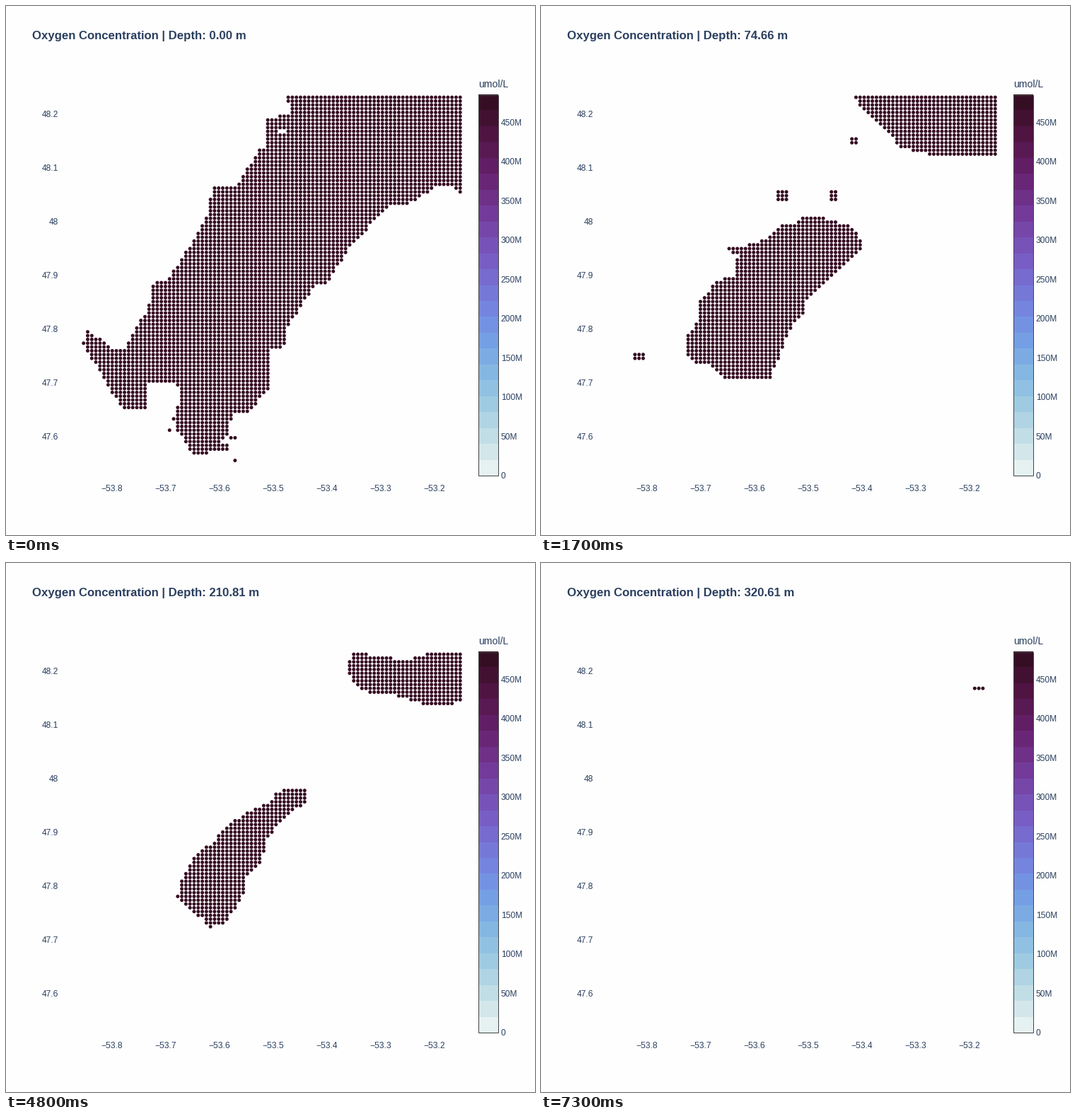
These frames come from a looping animation (748x748 px, 7.4 s). A matplotlib script:

```python
import numpy as np
import matplotlib.pyplot as plt
from matplotlib.animation import FuncAnimation
from matplotlib.colors import LinearSegmentedColormap
from matplotlib.patches import Rectangle

SIZE, DPI = 748, 100
FRAMES, STEP_MS = 74, 100
MAX_DEPTH = 320.61
INK, DOT, PAPER = "#2a3f5f", "#350b22", "#fefefe"
DENSE = ["#e6f1f1", "#bfdde5", "#9cc9e2", "#81b4e3", "#739ae4", "#757fdd",
         "#7864ca", "#774aaf", "#71328d", "#641f68", "#501442", "#360e24"]

# Sampling grid of the bay, in stage pixels
GX, GY = np.meshgrid(109.7 + 5.788 * np.arange(93), 129.1 + 5.349 * np.arange(97))
GRID = np.column_stack([GX.ravel(), GY.ravel()])


def pond(x, y, rx=2, ry=2):
    return [(x - rx, y - ry), (x + rx, y - ry), (x + rx, y + ry), (x - rx, y + ry)]


def signed_distance(outline):
    """Distance of every grid point to an outline, positive inside."""
    x, y = GRID.T
    dist = np.full(len(GRID), 1e9)
    inside = np.zeros(len(GRID), bool)
    for (px, py), (qx, qy) in zip(outline, outline[1:] + outline[:1]):
        dx, dy = qx - px, qy - py
        t = np.clip(((x - px) * dx + (y - py) * dy) / (dx * dx + dy * dy), 0, 1)
        dist = np.minimum(dist, np.hypot(x - px - t * dx, y - py - t * dy))
        if dy:
            inside ^= ((py > y) != (qy > y)) & (x < px + dx * (y - py) / dy)
    return np.where(inside, dist, -dist)


def field(*outlines, island=None):
    f = np.max([signed_distance(o) for o in outlines], axis=0)
    if island:
        f = np.minimum(f, -signed_distance(island) - 2)
    return np.maximum(f, -25)


# Key points of the water's edge at a few depths
east_shore = [
    (399, 129), (642, 129), (642, 264), (631, 253), (608, 255), (567, 280),
    (541, 280), (485, 340), (452, 391), (437, 391), (394, 456), (393, 480),
    (371, 486), (371, 540), (340, 575), (318, 577), (312, 604), (283, 632),
    (266, 632)]
west_shore = [
    (243, 599), (237, 583), (248, 560), (248, 540), (240, 532), (197, 532),
    (197, 566), (167, 568), (150, 545), (132, 513), (110, 477), (115, 461),
    (155, 489), (170, 486), (185, 455), (203, 429), (210, 394), (230, 388),
    (284, 304), (289, 275), (295, 258), (327, 257), (359, 205), (368, 203),
    (371, 160), (404, 155)]
surface = field(east_shore + west_shore, pond(231, 600), pond(323.5, 642.5),
                pond(321, 612), pond(303, 624, 9, 4), island=pond(390, 177, 4, 1))

north = [(434, 129), (642, 129), (642, 221), (600, 231), (490, 231), (434, 221),
         (434, 216), (446, 206), (434, 190), (442, 150)]
south = [
    (352, 285), (411, 280), (470, 284), (474, 318), (466, 348), (422, 397),
    (405, 405), (417, 418), (396, 426), (381, 478), (365, 480), (347, 518),
    (318, 545), (318, 572), (289, 594), (260, 583), (254, 561), (254, 537),
    (243, 526), (190, 526), (162, 497), (185, 489), (213, 407), (243, 386),
    (260, 362), (254, 346), (295, 320), (325, 293)]
cove = [(115, 478), (138, 478), (145, 503), (126, 503)]
point = [(488, 291), (510, 307), (497, 322), (485, 322)]
sills = [pond(x, 241, 6, 6) for x in (342, 417, 445, 467, 491, 514, 541, 567)]
sills += [pond(x, 268, 6, 6) for x in (336, 348, 363, 391, 413, 440, 465)]
shallow = field(north, south, cove, point, pond(417, 204, 1, 17),
                pond(362, 520, 3, 5), *sills, island=pond(379, 455, 4, 4))

north = [(446, 129), (642, 129), (642, 210), (555, 210), (508, 198), (497, 184),
         (452, 140)]
south = [
    (371, 300), (394, 300), (434, 311), (451, 331), (451, 342), (399, 391),
    (371, 418), (371, 434), (353, 451), (323, 525), (260, 525), (237, 504),
    (219, 503), (208, 492), (208, 467), (226, 445), (226, 420), (249, 391),
    (275, 383), (280, 352), (266, 344), (310, 336), (341, 311), (360, 309)]
middle = field(north, south, pond(342, 269, 6, 6), pond(415, 269, 5, 6),
               pond(443, 191, 4, 4), pond(138.5, 495, 6, 4))

north = [(491, 129), (538, 134), (562, 145), (602, 129), (642, 129), (642, 194),
         (590, 194), (562, 180), (514, 178), (491, 167)]
south = [
    (417, 322), (417, 332), (382, 354), (359, 391), (359, 418), (330, 442),
    (330, 467), (306, 504), (289, 509), (289, 499), (254, 472), (254, 456),
    (283, 413), (335, 370), (376, 350), (394, 328)]
trench = field(north, south)

floor = field([(596, 167), (642, 156), (642, 177), (596, 177)])
last = field(pond(619, 177, 6, 1))

# Frame, field there, and easing power on the way to the next one
KEYS = [(0, surface, 1), (5, shallow, 1), (17, middle, 1.5), (54, trench, 1),
        (72, floor, 1), (73, last, 1)]


def wet_points(frame):
    """Grid points still under water, blended between the known depths."""
    for (t0, f0, power), (t1, f1, _) in zip(KEYS, KEYS[1:]):
        if frame <= t1:
            k = ((frame - t0) / (t1 - t0)) ** power
            return GRID[f0 * (1 - k) + f1 * k > -1.8]


fig = plt.figure(figsize=(SIZE / DPI, SIZE / DPI), dpi=DPI, facecolor=PAPER)
ax = fig.add_axes([0, 0, 1, 1])
ax.set(xlim=(0, SIZE), ylim=(SIZE, 0))
ax.axis("off")


def label(x, baseline, text, px=12, ha="left", weight="normal"):
    return ax.text(x, baseline, text, fontsize=px * 72 / DPI, ha=ha,
                   va="baseline", weight=weight, color=INK,
                   family="Liberation Sans")


for n in range(7):
    label(74, 157.3 + 76 * n, f"{round(48.2 - n / 10, 1):g}", ha="right")
    label(150 + 76 * n, 685.8, f"\u2212{53.8 - n / 10:.1f}", ha="center")

# Colour bar in flat bands
BAR_TOP, BAR_END, BANDS = 125, 664, 24
dense = LinearSegmentedColormap.from_list("dense", DENSE, N=BANDS)
edges = np.linspace(BAR_END, BAR_TOP, BANDS + 1)
for n in range(BANDS):
    ax.add_patch(Rectangle((668.5, edges[n]), 28, edges[n + 1] - edges[n],
                           fc=dense(n), lw=0, antialiased=False))
ax.add_patch(Rectangle((668.5, 125.5), 28, 538, fill=False, ec="#444444", lw=0.72))
for n in range(10):
    label(699.7, 668.2 - 55.5 * n, f"{50 * n}M" if n else "0")
label(668, 115.3, "umol/L", 14)

title = label(37, 47, "", 16.8, weight="bold")
dots = ax.scatter([], [], s=(5 * 72 / DPI) ** 2, c=DOT, linewidths=0,
                  edgecolors="none")


def update(frame):
    depth = MAX_DEPTH * frame / (FRAMES - 1)
    title.set_text(f"Oxygen Concentration | Depth: {depth:.2f} m")
    dots.set_offsets(wet_points(frame))
    return title, dots


anim = FuncAnimation(fig, update, frames=FRAMES, interval=STEP_MS,
                     init_func=lambda: update(0), repeat=True, repeat_delay=0)
plt.show()
```
